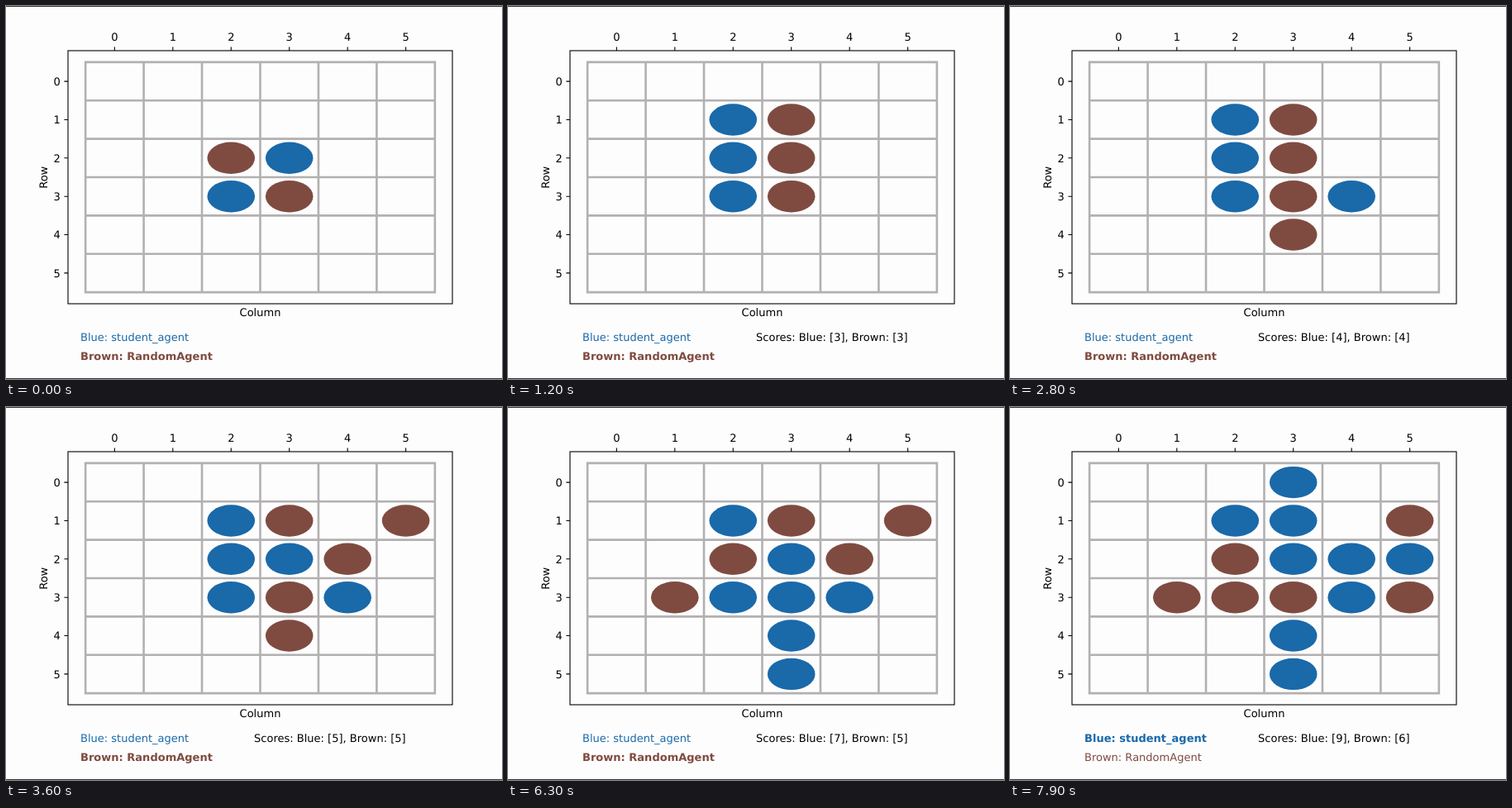
These frames come from a looping animation (600 px wide and 451 px high, 8000 ms). An HTML page:

```html
<!DOCTYPE html>
<html lang="en">
<head>
<meta charset="utf-8">
<title>Reversi match</title>
<style>
  html, body { margin: 0; width: 100%; height: 100%; overflow: hidden; background: #fdfdfd; }
  svg { display: block; width: 600px; height: 451px; }
  text { font: 13.02px "DejaVu Sans", sans-serif; text-rendering: geometricPrecision; }
  .axis { fill: none; stroke: #000; stroke-width: 1.1; }
  .grid { fill: none; stroke: #b2b0b1; stroke-width: 2.6; stroke-linecap: square; }
  .blue { fill: #1a69a9; }
  .brown { fill: #7f4b41; }
  .bold { font-weight: bold; }
</style>
</head>
<body>
<svg id="stage" viewBox="0 0 600 451">
  <rect width="600" height="451" fill="#fdfdfd"/>
  <path d="M0 .5H600M0 450.5H600" stroke="#333"/>
  <g id="board"></g>
  <rect class="axis" x="75" y="54" width="465" height="306"/>
  <text x="307.5" y="375.4" text-anchor="middle">Column</text>
  <text transform="translate(49.6 207.3) rotate(-90)" text-anchor="middle">Row</text>
  <g id="discs"></g>
  <text id="blueName" class="blue" x="90" y="405">Blue: student_agent</text>
  <text id="brownName" class="brown" x="90" y="427.5">Brown: RandomAgent</text>
  <text id="scores" x="300" y="405"></text>
</svg>
<script>
  const LOOP = 8000, SIZE = 6;
  const CELL_W = 465 / 6.6, CELL_H = 306 / 6.6;
  const lineX = i => 75 + (i + 0.3) * CELL_W;
  const lineY = i => 54 + (i + 0.3) * CELL_H;
  const byId = id => document.getElementById(id);

  function add(parent, tag, attrs, content = '') {
    const el = document.createElementNS('http://www.w3.org/2000/svg', tag);
    for (const key in attrs) el.setAttribute(key, attrs[key]);
    el.textContent = content;
    return parent.appendChild(el);
  }

  // Grid, ticks and tick labels
  const board = byId('board');
  let grid = '', ticks = '';
  for (let i = 0; i <= SIZE; i++) {
    grid += `M${lineX(i)} ${lineY(0)}V${lineY(SIZE)}M${lineX(0)} ${lineY(i)}H${lineX(SIZE)}`;
    if (i === SIZE) break;
    const x = lineX(i + 0.5), y = lineY(i + 0.5);
    ticks += `M${x} 54v-4.6M75 ${y}h-4.6`;
    add(board, 'text', { x, y: 42.3, 'text-anchor': 'middle' }, i);
    add(board, 'text', { x: 65.9, y: y + 4.75, 'text-anchor': 'end' }, i);
  }
  add(board, 'path', { class: 'grid', d: grid });
  add(board, 'path', { class: 'axis', d: ticks });

  const discs = Array.from({ length: SIZE * SIZE }, (_, i) => add(byId('discs'), 'ellipse', {
    cx: lineX(i % SIZE + 0.5), cy: lineY(Math.floor(i / SIZE) + 0.5), rx: 28.8, ry: 19.2
  }));

  // Turns alternate, blue first: [time, row, column]
  const moves = [
    [300, 1, 2], [700, 1, 3], [1500, 3, 4], [2000, 4, 3], [2900, 2, 4], [3400, 1, 5],
    [4900, 5, 3], [5400, 3, 1], [6400, 0, 3], [6900, 3, 5], [7800, 2, 5]
  ];

  // Places a disc and flips every line it closes
  function play(cells, row, col, color) {
    const next = cells.slice();
    next[row * SIZE + col] = color;
    for (let dr = -1; dr <= 1; dr++) for (let dc = -1; dc <= 1; dc++) {
      if (!dr && !dc) continue;
      const line = [];
      let r = row + dr, c = col + dc;
      const inside = () => r >= 0 && c >= 0 && r < SIZE && c < SIZE;
      while (inside() && cells[r * SIZE + c] && cells[r * SIZE + c] !== color) {
        line.push(r * SIZE + c);
        r += dr;
        c += dc;
      }
      if (inside() && cells[r * SIZE + c] === color) line.forEach(k => next[k] = color);
    }
    return next;
  }

  const opening = Array(SIZE * SIZE).fill('');
  opening[14] = opening[21] = 'brown';
  opening[15] = opening[20] = 'blue';
  const states = [{ time: 0, cells: opening, mover: 'brown', scores: '' }];
  moves.forEach(([time, row, col], i) => {
    const mover = i % 2 ? 'brown' : 'blue';
    const cells = play(states[i].cells, row, col, mover);
    const count = color => cells.filter(c => c === color).length;
    states.push({ time, cells, mover,
      scores: `Scores: Blue: [${count('blue')}], Brown: [${count('brown')}]` });
  });

  let shown;
  function show(state) {
    if (state === shown) return;
    shown = state;
    discs.forEach((disc, i) => {
      disc.setAttribute('class', state.cells[i]);
      disc.style.display = state.cells[i] ? '' : 'none';
    });
    byId('blueName').classList.toggle('bold', state.mover === 'blue');
    byId('brownName').classList.toggle('bold', state.mover === 'brown');
    byId('scores').textContent = state.scores;
  }

  const start = performance.now();
  function frame() {
    const t = (performance.now() - start) % LOOP;
    show(states.filter(s => s.time <= t).pop());
    requestAnimationFrame(frame);
  }
  frame();
</script>
</body>
</html>
```
